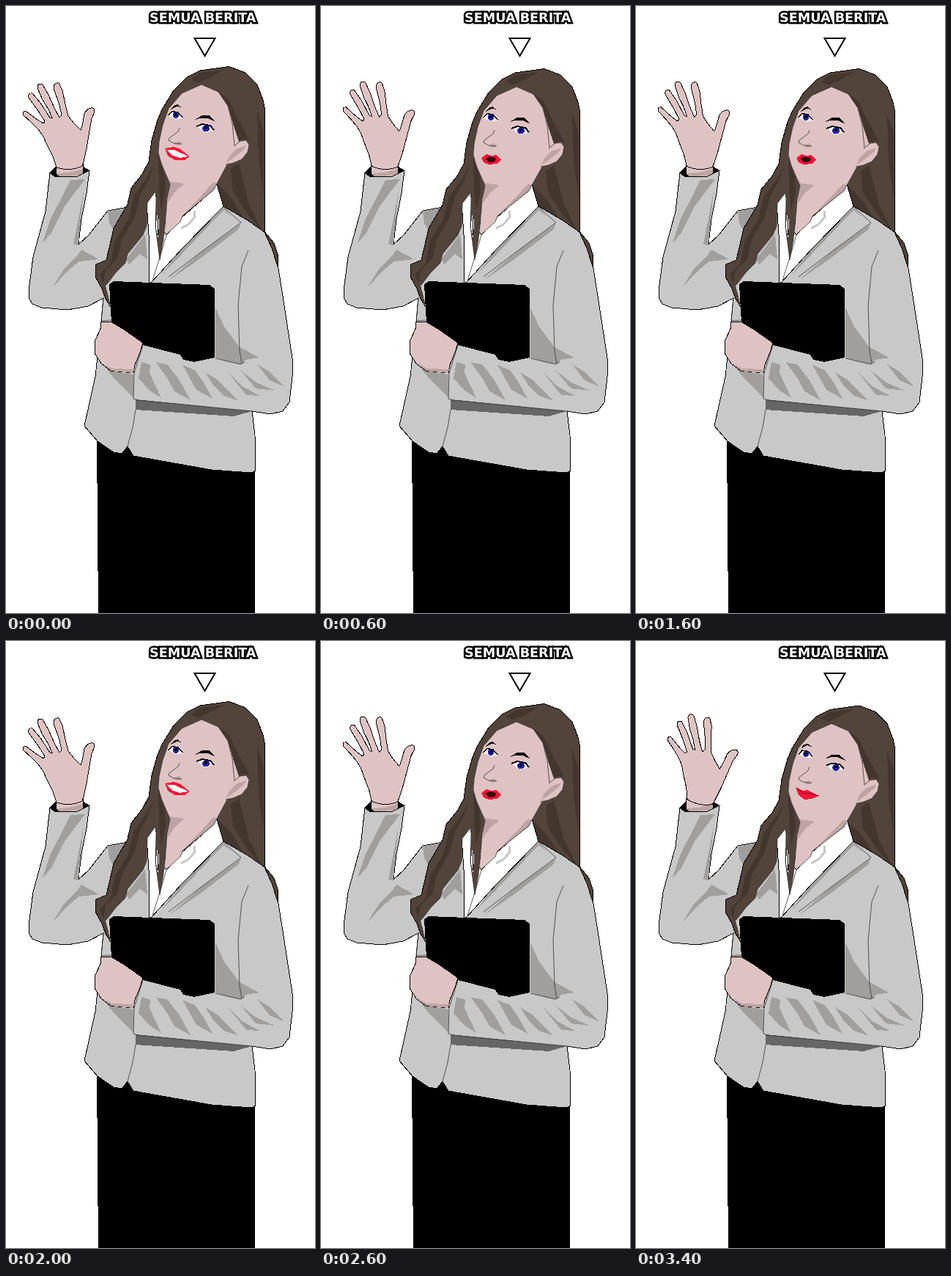
Animation, 422 px wide and 827 px high, one loop 3.6 s. Source, as an HTML page:

```html
<!DOCTYPE html>
<html lang="id">
<head>
<meta charset="utf-8">
<title>Semua Berita</title>
<style>
html, body { margin: 0; width: 100%; height: 100%; overflow: hidden; background: #fff; }
svg { display: block; width: 422px; height: 827px; shape-rendering: crispEdges; }
text { font: bold 17.6px "DejaVu Sans", sans-serif; fill: #fff; stroke: #000; stroke-width: 5; stroke-linejoin: miter; paint-order: stroke; }
.line { fill: none; stroke: #000; stroke-width: 1; }
.thin { fill: none; stroke: #333; stroke-width: .8; shape-rendering: auto; }
.out { stroke: #000; stroke-width: 1; }
.coat { fill: #c8c8c8; }
.fold { fill: #a19f9d; }
.skin { fill: #dfc3c3; }
.shade { fill: #bda4a2; }
.hair { fill: #52443b; }
.dark { fill: #43362f; }
.lip { fill: #ff1236; }
.gap { fill: #35090d; }
.white { fill: #fff; }
#mouths g { display: none; }
</style>
</head>
<body>
<svg viewBox="0 0 422 827">
  <text x="196" y="21.5">SEMUA BERITA</text>
  <polygon points="257.5,44 285.5,44 271.5,68" fill="#fff" stroke="#000" stroke-width="2" shape-rendering="auto"/>

  <polygon points="124,590 126,827 340,827 340,625 336,560"/>

  <!-- hair behind the shoulders -->
  <g class="warp">
    <polygon class="hair out" points="213,141 229,115 247,97 265,88 305,82.5 327,91 343,107 351,128 353.5,140 353.5,308 366,323 371,338 372,360 330,330 280,290 280,240 230,230"/>
    <polygon class="dark" points="247,104 265,91 298,87 278,98 256,107 238,119"/>
    <polygon class="dark" points="290,116 304,127 316,152 333,183 325,181 313,184 309,160 303,138"/>
    <polygon class="dark" points="318,214 307,222 310,252 330,284 350,307 332,270"/>
    <polygon class="dark" points="343,144 352,170 352,260 345,210"/>
    <polygon class="dark" points="289,243 297,272 325,290 308,262"/>
  </g>

  <!-- raised arm -->
  <polygon points="60,226 68,219 106,219 114,224 98,233 66,233"/>
  <polygon class="skin out" points="69,214 105,212 106,231 98,232 72,232 68,229"/>
  <polygon class="shade" points="70,228 86,227 105,222 105,231 72,232"/>
  <path id="hand" class="skin out" d="M69 220L64 205 57 191 50 176 44 168 34 158 24 149Q21 143 27 143L40 153 51 160 53 157 44 143 31 125Q29 118 36 119L47 132 60 152 63 152 57 139 50 128 43 112Q43 104 50 107L58 121 66 139 73 152 76 149 73 135 65 112Q65 104 72 105L77 115 81 134 85 150 93 160 102 169 104 163 107 147Q110 140 116 139 121 138 121 144L117 153 113 176 110 194 106 212 104 218Q88 226 69 220Z"/>

  <!-- jacket -->
  <polygon class="coat out" points="60,227 66,232 98,232 114,224 110,255 103,290 99,325 113,312 139,279 166,274 200,262 235,330 297,273 330,292 353,308 363,330 372,358 378,395 388,460 391,480 391,505 387,540 378,552 361,556 336,552 340,585 341,633 335,636 281,632 174,613 166,600 158,610 147,608 125,593 107,572 122,505 125,477 130,430 133,398 112,409 84,414 49,411 36,406 31,397 32,380 37,342 54,280"/>
  <g class="fold">
    <polygon points="88,237 108,236 80,273 62,309 50,323 61,290 78,257"/>
    <polygon points="106,252 102,290 99,326 92,325 99,290"/>
    <polygon points="63,384 80,357 95,343 103,332 127,345 100,348 84,361"/>
    <polygon points="139,280 166,275 159,286 146,304 141,296"/>
    <polygon points="164,345 190,311 193,345 183,338 168,352"/>
    <polygon points="320,297 318,304 264,345 222,374 238,360 268,334"/>
    <polygon points="297,275 307,286 286,301 242,336 214,364 240,331"/>
    <polygon points="286,411 298,437 319,465 346,479 327,482 321,488 304,485 286,479"/>
    <polygon points="124,477 145,497 174,502 174,534 148,508"/>
    <polygon points="185,485 197,489 196,500 212,534 195,523 181,507"/>
    <polygon points="205,486 220,488 237,510 252,537 230,525 221,508"/>
    <polygon points="241,489 258,496 270,513 282,535 260,523"/>
    <polygon points="272,499 287,508 318,538 298,531 284,518"/>
    <polygon points="300,495 322,518 347,531 328,530"/>
    <polygon points="321,497 342,513 367,524 341,521"/>
    <polygon points="343,488 361,499 379,518 360,510"/>
  </g>
  <polygon class="coat" points="297,278 308,287 302,291 319,295 283,319 230,358 204,375 240,338"/>
  <polygon points="177,536 336,552 311,559 177,550" fill="#666"/>
  <polyline class="thin" points="297,274 321,295 264,337 222,369"/>
  <polyline class="thin" points="331,333 322,355 317,408 319,470 322,487"/>
  <polyline class="thin" points="187,462 175,500 174,535 180,537 336,552"/>
  <polyline class="thin" points="177,550 173,574 166,600"/>
  <polyline class="thin" points="286,480 320,488 326,485"/>
  <polyline class="thin" points="133,398 130,429 144,428"/>

  <!-- shirt -->
  <polygon class="white out" points="204,252 192,267 195,312 195,378 199,376 240,331 297,273 288,243 270,262 240,288 219,312 210,300"/>
  <polyline points="257,279 258,287 250,297 239,303" fill="none" stroke="#c8c8c8" stroke-width="3"/>
  <polyline class="thin" points="219,312 213,333 200,374"/>

  <!-- neck, face and front locks -->
  <g class="warp">
    <polygon class="skin" points="267,107 240,118 221,139 213,162 208,188 208,203 214,218 222,240 219,270 218,312 238,294 241,286 284,250 288,242 294,231 302,216 320,190 310,160 303,136 290,117"/>
    <polygon class="shade" points="215,222 224,239 244,242 231,253 221,268 222,243"/>
    <polygon class="shade" points="288,242 283,240 268,257 241,286 284,251"/>
    <polyline class="thin" points="218,312 238,294 241,286 284,250 288,242 294,231 302,216"/>
    <polygon class="skin" points="300,216 305,199 311,191 320,184 328,183 332,189 330,199 322,209 310,214"/>
    <polygon class="shade" points="301,214 305,204 314,195 328,190 325,196 312,206"/>
    <polyline class="thin" points="311,191 320,184 328,183 332,189 330,199 322,209 310,214 300,216"/>
    <polygon class="hair" points="267,107 247,97 229,115 213,141 207,155 199,183 195,212 186,229 171,248 166,270 147,303 142,325 137,346 123,352 122,369 131,385 136,399 143,410 139,392 136,381 141,375 150,363 163,350 166,338 187,312 192,300 193,268 204,253 205,262 204,300 210,346 215,318 218,290 220,262 224,243 219,231 212,214 208,200 209,185 214,162 222,140 240,119"/>
    <polygon class="dark" points="203,215 196,234 183,259 176,287 158,319 152,345 136,360 133,378 128,365 143,350 149,320 167,290 175,258 191,236"/>
    <polygon class="dark" points="208,204 217,230 218,252 212,278 209,250"/>
    <polyline class="line" points="229,115 213,141 207,155 199,183 195,212 186,229 171,248 166,270 147,303 142,325 137,346 123,352 122,369 131,385 136,399 143,410"/>
    <polyline class="thin" points="136,381 141,375 150,363 163,350 166,338 187,312 192,300 193,268 204,253 205,262 204,300 210,346 215,318 218,290 220,262 224,243 219,231 212,214 208,200 209,185 214,162 222,140 240,119 267,107 290,117 303,136 309,160 312,190"/>
  </g>
  <polygon class="white" points="206,284 209,291 208,318 205,302"/>
  <polyline class="line" points="207,288 208,300 207,312"/>

  <g id="face">
    <polygon points="225,141 229,136 234,134 241,139 234,136.5"/>
    <polygon points="258,155 268,149 277,149 287,158 276,153 267,152.5"/>
    <polygon class="white" points="222,149 227,144 236,146 241,153 232,154"/>
    <ellipse cx="232" cy="148.5" rx="4" ry="4.5" fill="#2424b4"/>
    <circle cx="232" cy="148" r="2"/>
    <polyline points="222,149 227,143.5 235,145 241,152" fill="none" stroke="#000" stroke-width="1.5"/>
    <polygon class="white" points="262,165 268,162 279,164 283,169 274,172 267,170"/>
    <ellipse cx="273" cy="167" rx="5" ry="4.5" fill="#2424b4"/>
    <circle cx="273" cy="166" r="2"/>
    <polyline points="260,164 268,161 279,163 284,169" fill="none" stroke="#000" stroke-width="2"/>
    <polygon class="shade" points="229,187 236,184 240,188 234,190"/>
    <polyline class="thin" points="237,166 235,171 223,180 222,183 229,187 240,188"/>
  </g>

  <g id="mouths">
    <g>
      <polygon class="lip" points="217,194 229,192 238,195 251,205 244,210 231,210 221,204"/>
      <polygon class="white" points="219,196 230,196 249,205 237,207 226,203"/>
    </g>
    <g>
      <polygon class="lip" points="217,197 221,195 231,197 240,199 249,208 244,214 232,216 223,210"/>
      <polygon class="gap" points="219,199 247,209 241,213 231,213 224,208"/>
      <polygon class="white" points="219,198 231,200 246,209 232,207"/>
    </g>
    <g>
      <polygon class="lip" points="218,199 228,204 234,203 250,211 240,215 230,216 222,210"/>
      <polyline points="219,200 228,207 235,207 250,211" fill="none" stroke="#8a0a20"/>
    </g>
    <g>
      <polygon class="lip" points="219,207 226,202 232,204 239,203 246,209 240,215 229,216 222,213"/>
      <polygon class="gap" points="224,208 231,205 239,207 238,212 230,213"/>
    </g>
    <g>
      <polygon class="lip" points="219,197 229,197 238,199 255,209 247,217 237,221 227,214"/>
      <polygon class="gap" points="222,201 252,209 245,215 237,218 229,211"/>
      <polygon class="white" points="222,199 237,201 251,209 238,207 228,206"/>
    </g>
  </g>

  <!-- folder and the hand holding it -->
  <polygon points="141,379 147,375 278,380 285,385 285,479 257,485 242,482 238,475 187,462 144,432"/>
  <polygon class="skin out" points="129,430 143,430 163,442 187,459 183,472 176,489 174,500 143,497 130,487 121,473 122,455 129,440"/>
  <polygon class="shade" points="133,487 145,494 175,495 174,500 143,497"/>
</svg>
<script>
const STEP = 200, LOOP = 3600;
const tilts = [0, 5.2, 14];      // wave of the hand, degrees
const drops = [0, 3, 5.5];       // nod of the head, pixels
const cycle = [0, 1, 2, 1, 0];   // pose used with each mouth

const hand = document.getElementById('hand');
const face = document.getElementById('face');
const mouths = [...document.querySelectorAll('#mouths g')];
const soft = [...document.querySelectorAll('.warp > *')].map(el => ({
  el,
  pts: el.getAttribute('points').split(' ').map(p => p.split(',').map(Number))
}));

// The nod fades out from the jaw down to the shoulders.
const weight = y => Math.min(1, Math.max(0, (290 - y) / 70));

function show(beat) {
  const pose = cycle[beat], drop = drops[pose];
  hand.setAttribute('transform', `rotate(${tilts[pose]} 87 222)`);
  face.setAttribute('transform', `translate(0 ${drop})`);
  for (const { el, pts } of soft) {
    el.setAttribute('points', pts.map(([x, y]) => `${x},${y + drop * weight(y)}`).join(' '));
  }
  mouths.forEach((m, i) => { m.style.display = i === beat ? 'inline' : 'none'; });
}

let last = -1;
function tick() {
  const beat = Math.floor(performance.now() % LOOP / STEP) % cycle.length;
  if (beat !== last) show(last = beat);
  requestAnimationFrame(tick);
}
tick();
</script>
</body>
</html>
```
